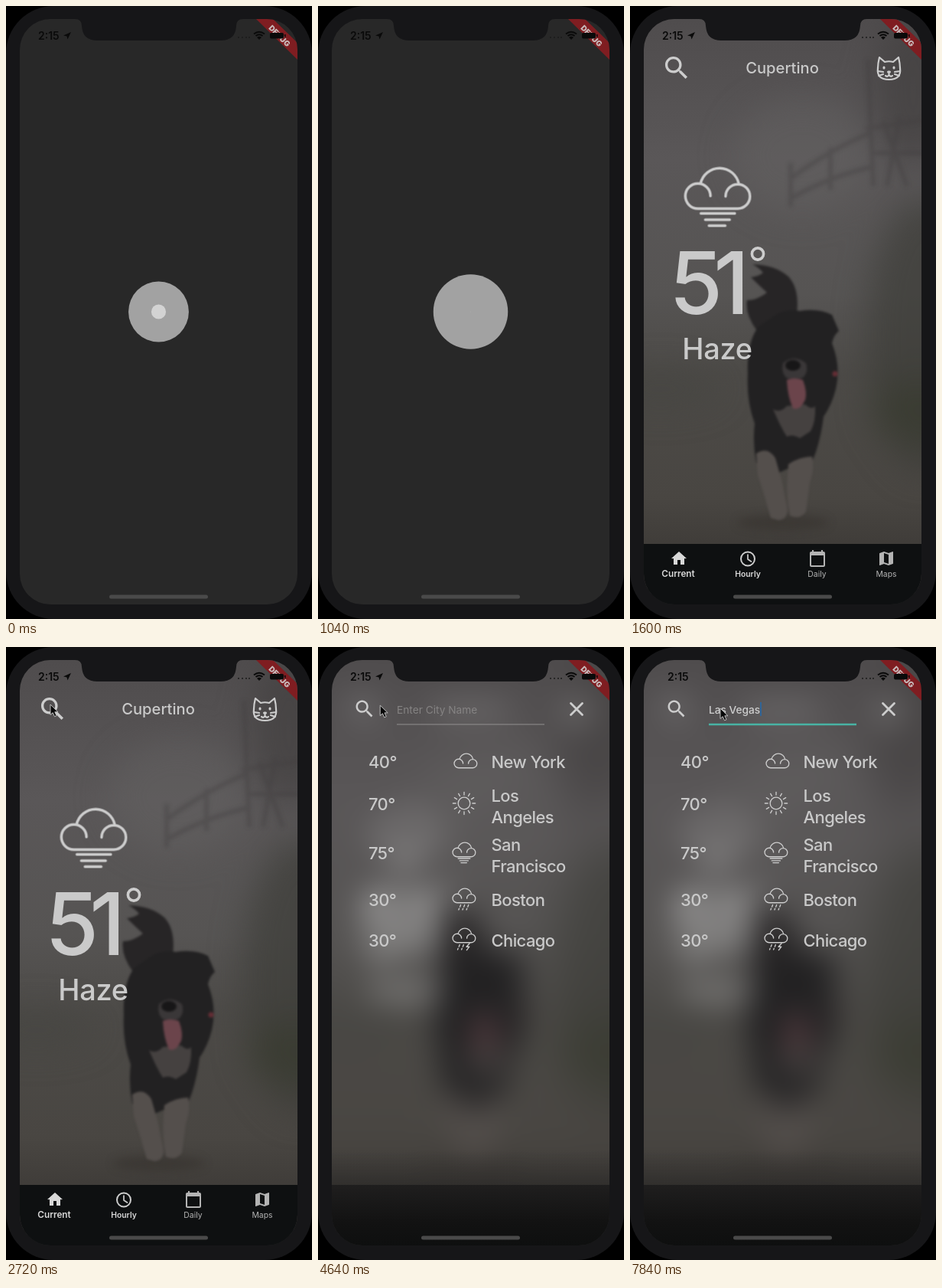
Write an HTML page that moves like this. It is 400 px wide and 800 px high and loops after 8000 ms.

```html
<!DOCTYPE html>
<html lang="en">
<head>
<meta charset="utf-8">
<title>Weather search</title>
<style>
  html, body { margin: 0; width: 100%; height: 100%; overflow: hidden; background: #000; }
  svg { display: block; width: 400px; height: 800px; font-family: Inter, Roboto, sans-serif; }
  .line { fill: none; stroke: #cdcdcd; stroke-linecap: round; stroke-linejoin: round; }
  .nav text { text-anchor: middle; font-size: 10.4px; }
  #list { font-size: 22px; font-weight: 500; letter-spacing: -.6px; fill: #c9c9c9; }
  #list .line { stroke-width: 3.9; }
  #entry { font-size: 13.7px; }
</style>
</head>
<body>
<svg viewBox="0 0 400 800">
  <defs>
    <clipPath id="screen"><path d="M58 17H90Q99 17 99 26Q100 45 119 45H281Q300 45 301 26Q301 17 310 17H341A40 40 0 0 1 381 57V741A40 40 0 0 1 341 781H58A40 40 0 0 1 18 741V57A40 40 0 0 1 58 17Z"/></clipPath>
    <clipPath id="pageBox"><rect x="18" y="16" width="363" height="766"/></clipPath>
    <linearGradient id="fog" x2="0" y2="1">
      <stop offset="0" stop-color="#4c494a"/><stop offset=".3" stop-color="#5a5758"/>
      <stop offset=".52" stop-color="#565453"/><stop offset=".65" stop-color="#4c4a47"/>
      <stop offset=".85" stop-color="#494642"/><stop offset="1" stop-color="#373431"/>
    </linearGradient>
    <linearGradient id="shade"><stop offset="0" stop-opacity="0"/><stop offset="1" stop-opacity=".35"/></linearGradient>
    <linearGradient id="dusk" x2="0" y2="1">
      <stop offset="0" stop-color="#1c1c1c" stop-opacity="0"/><stop offset=".36" stop-color="#1c1c1c" stop-opacity=".4"/>
      <stop offset=".36" stop-color="#1f1e1e"/><stop offset=".75" stop-color="#121212"/><stop offset="1" stop-color="#0e0f0f"/>
    </linearGradient>
    <path id="cloud" d="M-10 0A17 17 0 1 0-27 17H27A16.5 16.5 0 1 0 10.5 .5M-23.5-16.6A26.5 26.5 0 0 1 28.5-16"/>
    <path id="haze" d="M-23 23.500h46M-17 32h33M-12 40h22"/>
    <path id="rain" d="M-13 25l-3 8M2 25l-3 8M17 25l-3 8M-19 39l-2 5M-4 39l-2 5M11 39l-2 5"/>
    <path id="storm" d="M-17 25l-3 8M-2 25l-3 8M-23 39l-2 5M-8 39l-2 5M21 20L9 33H20L10 46"/>
    <path id="lens" fill="#cdcdcd" transform="translate(-11.750 -11.750)" d="M15.500 14h-.79l-.28-.27C15.410 12.590 16 11.110 16 9.500 16 5.910 13.090 3 9.500 3S3 5.910 3 9.500 5.910 16 9.500 16c1.610 0 3.090-.59 4.230-1.570l.27.28v.79l5 4.990L20.490 19zM9.500 14C7 14 5 12 5 9.500S7 5 9.500 5 14 7 14 9.500 12 14 9.500 14z"/>
  </defs>

  <rect width="400" height="800" rx="62" fill="#161618"/>
  <g clip-path="url(#screen)">
    <rect x="18" y="16" width="363" height="766" fill="#282828"/>
    <g id="loader" fill="#f3f3f3" fill-opacity=".6">
      <circle cx="199.500" cy="399"/><circle cx="199.500" cy="399"/>
    </g>

    <g id="page">
      <rect x="-10" y="16" width="28" height="766" fill="url(#shade)"/>
      <g clip-path="url(#pageBox)">
        <g id="body">
          <rect x="-60" y="-40" width="520" height="800" fill="url(#fog)"/>
          <g style="filter:blur(22px)">
            <ellipse cx="225" cy="195" rx="90" ry="75" fill="#656263" opacity=".5"/>
            <ellipse cx="385" cy="430" rx="75" ry="180" fill="#3c3d38" opacity=".65"/>
            <ellipse cx="375" cy="530" rx="60" ry="40" fill="#363a2e" opacity=".6"/>
            <ellipse cx="370" cy="110" rx="50" ry="100" fill="#434041" opacity=".7"/>
            <ellipse cx="40" cy="500" rx="80" ry="25" fill="#444440" opacity=".5"/>
          </g>
          <ellipse cx="200" cy="674" rx="60" ry="10" fill="#37332f" opacity=".6" style="filter:blur(6px)"/>
          <path d="M311 70L318 235M352 145L336 235M331 150L362 235M308 160L390 148M316 192H390M210 225Q265 185 316 165M212 250Q262 222 316 210M210 205V262M262 185V240" fill="none" stroke="#434041" stroke-width="6" opacity=".4" style="filter:blur(2.5px)"/>
          <g style="filter:blur(1.6px)">
            <path fill="#272526" d="M166 424Q150 402 153 384Q166 384 179 374Q168 364 158 354Q168 353 174 348Q168 341 160 337Q190 338 207 353Q222 369 218 402L202 424Z"/>
            <path fill="#222122" d="M183 408Q200 394 222 398Q246 394 264 403L273 424Q266 430 264 440Q276 470 269 500Q264 520 253 536Q250 560 243 582L232 610L206 604L188 612L165 596Q160 570 163 545Q152 515 154 480Q152 440 168 418Z"/>
            <path fill="#544f4c" d="M165 584Q180 574 190 590L198 618L206 657Q206 670 194 671L184 668Q180 655 176 640L167 612ZM207 598Q222 588 238 588Q242 602 235 622L230 660Q222 671 209 665Q204 640 206 612Z"/>
            <path fill="#454140" d="M187 526Q196 532 205 522L229 520Q238 528 242 522Q243 543 236 555L222 564Q212 558 205 562Q196 548 187 526Z"/>
            <path fill="#3a3738" d="M200 466Q214 454 230 466Q234 480 224 486H206Q197 480 200 466Z"/>
            <ellipse cx="213" cy="469" rx="10" ry="7" fill="#171617"/>
            <path fill="#6b444b" d="M205 488Q214 484 226 488Q232 504 229 514Q222 529 213 525Q206 510 205 488Z"/>
            <circle cx="268" cy="480" r="3.500" fill="#642d34"/>
          </g>
          <use href="#lens" transform="translate(60.500 80.500) scale(1.660)"/>
          <text x="199" y="87.500" text-anchor="middle" font-size="20.200" font-weight="500" fill="#c9c9c9">Cupertino</text>
          <g class="line" stroke-width="2.200">
            <path d="M326 67L333 73Q338.500 71.500 344 73L351 67Q353 75 353 81Q355 96 338.500 96Q322 96 324 81Q324 75 326 67ZM338.500 87V90M334 91Q337 93 338.500 90Q341 93 343 91M324 85L331 86M325 91L331 89M353 85L346 86M352 91L346 89"/>
            <path d="M332 80v1M345 80v1M337.500 86h2" stroke-width="3"/>
          </g>
          <g class="line" stroke-width="3.600" transform="translate(114.800 248) scale(.965)"><use href="#cloud"/><use href="#haze"/></g>
          <text x="53" y="402" font-size="113" font-weight="500" letter-spacing="-12" fill="#cacaca">51</text>
          <circle cx="167" cy="323.500" r="7.600" class="line" stroke-width="3.600"/>
          <text x="114" y="461" text-anchor="middle" font-size="38" font-weight="500" letter-spacing="-.3" fill="#cacaca">Haze</text>
        </g>
        <rect x="18" y="702" width="363" height="80" fill="#0e1011"/>
        <g id="nav" class="nav" fill="#d8d8d8">
          <path transform="translate(52 709)" d="M10 20v-6h4v6h5v-8h3L12 3 2 12h3v8z"/>
          <text x="63" y="745" style="font-size:11.8px" font-weight="600">Current</text>
          <circle cx="154" cy="721.500" r="9" class="line" stroke-width="2"/><path d="M154 716v6l4.500 3" class="line" stroke-width="1.700"/>
          <text x="154" y="745" font-weight="600">Hourly</text>
          <g fill="#b4b4b4">
            <path transform="translate(233 709)" d="M20 3h-1V1h-2v2H7V1H5v2H4c-1.100 0-2 .9-2 2v16c0 1.100.9 2 2 2h16c1.100 0 2-.9 2-2V5c0-1.100-.9-2-2-2zm0 18H4V8h16v13z"/>
            <text x="244.500" y="745">Daily</text>
            <path transform="translate(323 709)" d="M20.500 3 15 5.100 9 3 3.400 4.900Q3 5 3 5.400V20.500Q3 21 3.600 21L9 18.900l6 2.100 5.600-1.900Q21 19 21 18.600V3.500Q21 3 20.500 3zM15 19l-6-2.100V5l6 2.100z"/>
            <text x="335" y="745">Maps</text>
          </g>
        </g>
      </g>
    </g>

    <g id="search">
      <rect x="18" y="657" width="363" height="125" fill="url(#dusk)"/>
      <use href="#lens" transform="translate(60.500 80.500) scale(1.250)"/>
      <path d="M330.500 73.500l15 15M345.500 73.500l-15 15" class="line" stroke-width="2.800"/>
      <rect id="rule" x="103" width="193"/>
      <text id="entry" x="103" y="86.500"></text>
      <rect id="caret" y="72" width="1.600" height="18" fill="#2668a8"/>
      <g id="list"></g>
    </g>

    <path d="M327 17H349L381 48V70Z" fill="#7f1d21"/>
    <text transform="translate(357.500 39) rotate(45)" y="3.600" text-anchor="middle" font-size="10" font-weight="900" fill="#c9bcbc">DEBUG</text>
    <g fill="#0a0a0a">
      <text id="clock" y="43.500" font-size="14" font-weight="600">2:15</text>
      <path id="arrow" d="M85 34L80.500 43.500L79.500 39.500L75 38.500Z"/>
      <path d="M304 41h0M309 41h0M314 41h0M318 41h0" stroke="#1b1b1b" stroke-width="2" stroke-linecap="round"/>
      <path d="M324 36.500Q331 31 338 36.500M326.500 39Q331 35.500 335.500 39" fill="none" stroke="#0a0a0a" stroke-width="2"/>
      <path d="M328 41Q331 38.500 334 41L331 44Z"/>
      <rect x="345" y="35" width="18" height="7.500" rx="2"/><rect x="364" y="37" width="1.500" height="3.500"/>
    </g>
    <rect x="135" y="768.500" width="129" height="5" rx="2.500" fill="#4a4a4a"/>
    <path id="cursor" d="M0 0V13.500L3.200 10.700L5.500 15.800L8 14.700L5.800 9.800H10Z" fill="#080808" stroke="#bdbdbd" stroke-width="1"/>
  </g>
</svg>
<script>
const $ = id => document.getElementById(id);
const LOOP = 8000, PAGE_IN = 1100, SEARCH_IN = 3520, FOCUS = 5200, ARROW_OUT = 6400;

const cities = [
  [40, 158, 193, 152, '<use href="#cloud"/>', ['New York', 158]],
  [70, 213, 191, 204, 'sun', ['Los', 202, 'Angeles', 230]],
  [75, 277, 191, 268, '<use href="#cloud"/><use href="#haze"/>', ['San', 266, 'Francisco', 294]],
  [30, 338, 191, 328, '<use href="#cloud"/><use href="#rain"/>', ['Boston', 338]],
  [30, 391, 191, 380, '<use href="#cloud"/><use href="#storm"/>', ['Chicago', 391]]
];
const sun = '<circle r="23"/>' + Array.from({ length: 12 }, (_, i) =>
  `<path d="M0-32V-43" transform="rotate(${i * 30})"/>`).join('');
$('list').innerHTML = cities.map(([temp, base, x, y, icon, name]) => {
  let out = `<text x="66" y="${base}">${temp}°</text>` +
    `<g class="line" transform="translate(${x} ${y}) scale(.34)">${icon === 'sun' ? sun : icon}</g>`;
  for (let i = 0; i < name.length; i += 2) out += `<text x="226.500" y="${name[i + 1]}">${name[i]}</text>`;
  return out;
}).join('');

// CSS-style cubic bezier, solved by bisection
function bezier(x1, y1, x2, y2) {
  const at = (a, b, u) => 3 * (1 - u) ** 2 * u * a + 3 * (1 - u) * u * u * b + u ** 3;
  return x => {
    let lo = 0, hi = 1;
    for (let i = 0; i < 24; i++) {
      const mid = (lo + hi) / 2;
      if (at(x1, x2, mid) < x) lo = mid; else hi = mid;
    }
    return at(y1, y2, lo);
  };
}
const easeInOut = bezier(.42, 0, .58, 1);
const slideOut = bezier(.35, .91, .33, .97);
const clamp = v => Math.max(0, Math.min(1, v));

const phrase = 'Las Vegas';
const keyTimes = [5440, 5680, 5900, 6240, 6880, 7120, 7280, 7520, 7760];

// time, x, y
const cursorPath = [[2000, -14, 238], [2720, 58, 75], [2880, 58, 75], [3500, 71, 75], [4400, 71, 75], [5200, 118, 80]];
function cursorAt(t) {
  let i = 0;
  while (i < cursorPath.length - 2 && t > cursorPath[i + 1][0]) i++;
  const [a, b] = [cursorPath[i], cursorPath[i + 1]];
  const k = clamp((t - a[0]) / (b[0] - a[0])), s = k * k * (3 - 2 * k);
  return [a[1] + (b[1] - a[1]) * s, a[2] + (b[2] - a[2]) * s];
}

const show = (id, on) => { $(id).style.display = on ? '' : 'none'; };
const set = (id, attrs) => { for (const k in attrs) $(id).setAttribute(k, attrs[k]); };
const discs = $('loader').children;

function draw(t) {
  const slid = t < PAGE_IN ? 0 : slideOut(clamp((t - 860) / 500));
  const cycle = (t + 885) / 2000;
  const phase = cycle % 2 < 1 ? cycle % 1 : 1 - cycle % 1;
  const pulse = Math.abs(2 * easeInOut(phase) - 1);
  discs[0].setAttribute('r', 49 * pulse);
  discs[1].setAttribute('r', 49 * (1 - pulse));
  set('loader', { transform: `translate(${-121 * slid})` });
  set('page', { transform: `translate(${363 * (1 - slid)})` });
  show('loader', slid < 1);
  show('page', t >= PAGE_IN);

  const open = t >= SEARCH_IN, focus = t >= FOCUS;
  $('body').style.filter = open ? 'blur(20px)' : '';
  show('nav', !open);
  show('search', open);
  if (open) {
    const typed = phrase.slice(0, keyTimes.filter(k => t >= k).length);
    $('entry').textContent = typed.replace(/ $/, '\u00a0') || 'Enter City Name';
    set('entry', { fill: typed ? '#cfcfcf' : '#858383', 'font-weight': typed ? 500 : 400 });
    set('rule', focus ? { y: 99.8, height: 2.5, fill: '#48b3a4' } : { y: 100.5, height: 1, fill: '#929090' });
    show('caret', focus);
    set('caret', { x: 103 + (typed ? $('entry').getComputedTextLength() : 0) });
  }

  const arrow = t < ARROW_OUT;
  show('arrow', arrow);
  set('clock', { x: arrow ? 42 : 49 });
  set('cursor', { transform: `translate(${cursorAt(t)})` });
}

function frame() {
  draw(performance.now() % LOOP);
  requestAnimationFrame(frame);
}
frame();
</script>
</body>
</html>
```
